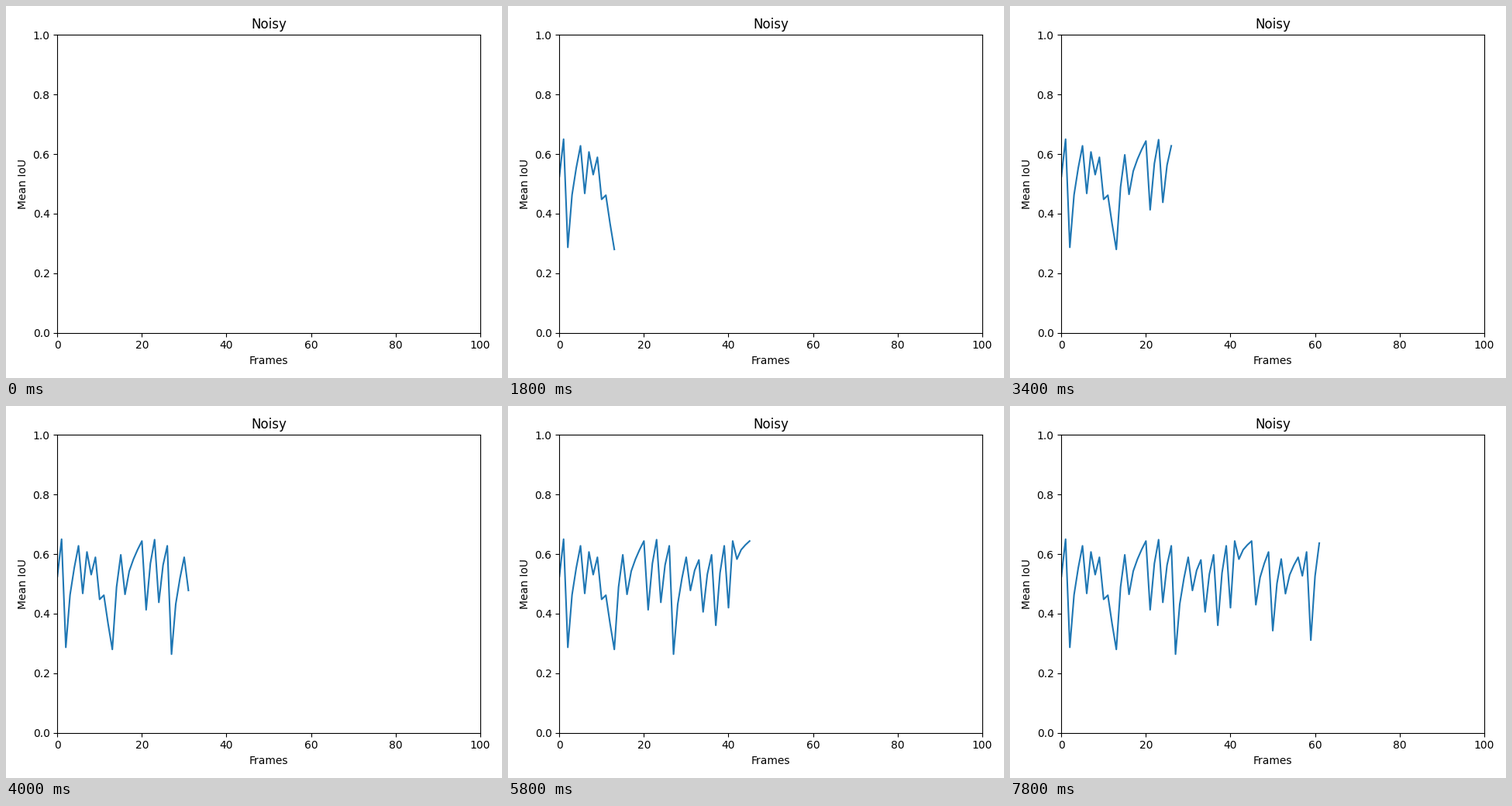
Animation, 640 px wide and 480 px high, one loop 8000 ms. Source, as a matplotlib script:

```python
import matplotlib.pyplot as plt
import numpy as np
from matplotlib.animation import FuncAnimation

FRAMES = 40
INTERVAL = 200      # ms per frame
RATE = 8 / 5        # samples revealed per frame
SAMPLES = 62

# Low points of the score: sample -> mean IoU
DIPS = {0: .525, 2: .287, 6: .468, 8: .531, 10: .448, 11: .462, 12: .366,
        13: .28, 16: .465, 21: .413, 24: .438, 27: .264, 31: .478, 34: .406,
        37: .361, 40: .42, 42: .583, 46: .43, 50: .343, 53: .467, 57: .527,
        59: .311}


def crest(x):
    """Upper level of the score, a slow wave."""
    return 0.615 + 0.035 * np.cos(2 * np.pi * (x - 1) / 21)


def noisy_score():
    """Climb from each dip to a crest just before the next one."""
    starts = list(DIPS)
    parts = []
    for start, end in zip(starts, starts[1:] + [SAMPLES]):
        low = DIPS[start]
        t = np.linspace(0, 1, end - start)
        parts.append(low + (crest(end - 1) - low) * t ** 0.6)
    return np.concatenate(parts)


xs = np.arange(SAMPLES)
iou = noisy_score()

fig, ax = plt.subplots(figsize=(6.4, 4.8), dpi=100)
ax.set(xlim=(0, 100), ylim=(0, 1), title="Noisy",
       xlabel="Frames", ylabel="Mean IoU")
line, = ax.plot([], [], color="tab:blue", lw=1.5)
fig.tight_layout()


def update(frame):
    count = int(frame * RATE)
    line.set_data(xs[:count], iou[:count])
    return line,


anim = FuncAnimation(fig, update, frames=FRAMES, interval=INTERVAL,
                     repeat=True, repeat_delay=0)
plt.show()
```
